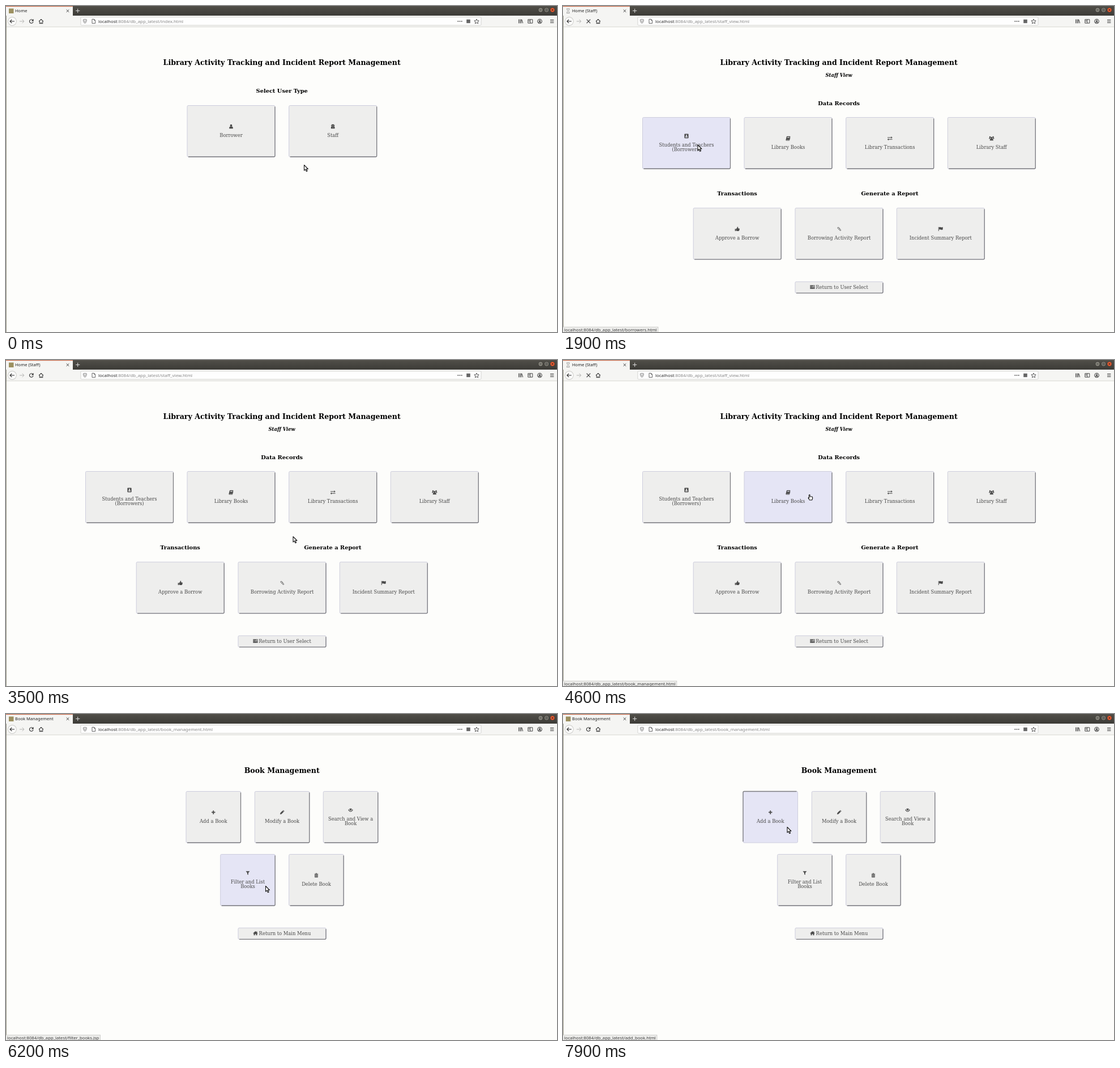
An HTML page with a canvas for the animation above (8 s loop, 973 by 575 pixels).

```html
<!DOCTYPE html>
<html lang="en">
<head>
<meta charset="utf-8">
<title>Library</title>
<style>
html, body { margin: 0; width: 100%; height: 100%; overflow: hidden; background: #fdfdfb; }
canvas { display: block; }
</style>
</head>
<body>
<canvas id="stage" width="973" height="575"></canvas>
<script>
const ctx = document.getElementById('stage').getContext('2d');
const LOOP = 8000, STEP = 100;
const SERIF = '"DejaVu Serif", serif', SANS = '"Noto Sans", "Open Sans", sans-serif';
const INK = '#4a4a4a', HOST = 'localhost', ROOT = ':8084/db_app_latest/';

// Filled glyphs, centred on the origin in a box of about 8 units.
const ICONS = {
  user: 'M-1.9-1.8a1.9 2 0 1 1 3.8 0a1.9 2.2 0 1 1-3.8 0zM-3.3 3.7v-1.3q0-2.2 1.8-2.3q1.5 1 3 0q1.8.1 1.8 2.3v1.3z',
  agent: 'M-3.3 3.8v-2q0-1.5 1-2l-.5-1.3h-.6v-.6h1l.5-1.7h3.8l.5 1.7h1v.6h-.6l-.5 1.3q1 .5 1 2v2zM-1.5-1.2v.8h1.2v-.8zM.3-1.2v.8h1.2v-.8zM-.5 1.2l.5 2l.5-2z',
  badge: 'M-3.6-3.1q0-.8.8-.8h5.6q.8 0 .8.8v6.2q0 .8-.8.8h-5.6q-.8 0-.8-.8zM-1.2-1.2a1.2 1.3 0 1 0 2.4 0a1.2 1.3 0 1 0-2.4 0zM-2.2 2.3h4.4q0-2-1.3-2h-1.8q-1.3 0-1.3 2z',
  book: 'M-1.8-3.6h5.2q.7 0 .5.7l-1.7 5.1q-.2.5-.8.5h-4.2q-.5.4 0 .6h4.7l1.6-4.4l.4.4l-1.4 4.2q-.2.5-.7.5h-4.9q-1.3-.4-.9-1.5l1.3-5.2q.2-.8.9-.9zM-1.2-2.4l-.2.7h3.7l.2-.7zM-1.6-1l-.2.6h3.7l.2-.6z',
  swap: 'M-4.2-2h6.5v-1.4l2.2 2l-2.2 2v-1.5h-6.5zM4.4 1.3h-6.5v-1.3l-2.3 1.9l2.3 2v-1.5h6.5z',
  group: 'M-1.7-1a1.7 1.8 0 1 1 3.4 0a1.7 1.8 0 1 1-3.4 0zM-3 3.8v-1q0-2 1.5-2.2h3q1.5.2 1.5 2.2v1zM-4-2.5a1.2 1.2 0 1 1 2.4 0a1.2 1.2 0 1 1-2.4 0zM1.6-2.5a1.2 1.2 0 1 1 2.4 0a1.2 1.2 0 1 1-2.4 0zM-4.6.8q-.3-2 1-2h1.2l.4 1.5l-1 .5zM4.6.8q.3-2-1-2h-1.2l-.4 1.5l1 .5z',
  thumb: 'M-4-.3h1.7v4h-1.7zM-1.9-.2q2-1.4 2-3.5q1.6-.2 1.5 1.4l-.4 1.4h2.1q1 .2.7 1.2q.3.8-.2 1.2q.1.8-.4 1.1q-.1 1-1 1.1h-2.2q-1 0-2.1-.6z',
  flag: 'M-4-3.5h.9v7.3h-.9zM-2.7-3.1q1.6-.9 3.1 0q1.3.7 3.5-.3v4.3q-2 1.1-3.5.3q-1.4-.8-3.1.1z',
  list: 'M-4.2-3.2h8.4v1.8h-8.4zM-4.2-.9h8.4v1.8h-8.4zM-4.2 1.4h8.4v1.8h-8.4zM1-2.5v.4h2.5v-.4zM-1-.2v.4h4.5v-.4zM2 2.1v.4h1.5v-.4z',
  plus: 'M-.9-3.2h1.8v2.3h2.3v1.8h-2.3v2.3h-1.8v-2.3h-2.3v-1.8h2.3z',
  pencil: 'M-3.6 3.6l.5-2.5l4-4l2 2l-4 4zM1.4-3.3l.7-.6l2 2l-.7.6z',
  eye: 'M-4.3 0q4.3-6 8.6 0q-4.3 6-8.6 0zM-2.9-.5q2.9 5 5.8 0q-1-1.3-1.7-1.4q.7 2.9-1.2 2.9t-1.2-2.9q-.8.2-1.7 1.4z',
  filter: 'M-3.5-3.3h7l-2.6 3v3.7l-1.8-1.2v-2.5z',
  trash: 'M-3.3-2.7h1.8l.4-1h2.2l.4 1h1.8v.8h-6.6zM-2.8-1.4h5.6v5.1h-5.6zM-1.6-.6v3.4h.5v-3.4zM-.3-.6v3.4h.6v-3.4zM1.1-.6v3.4h.5v-3.4z',
  house: 'M-4.2 0l4.2-3.7l1.8 1.6v-1.1h1.1v2.1l1.3 1.1l-.5.5l-.7-.6v3.5h-2.1v-2.3h-1.8v2.3h-2.1v-3.5l-.7.6z'
};
for (const name in ICONS) ICONS[name] = new Path2D(ICONS[name]);

const card = (x, y, w, icon, ...lines) => ({ x, y, w, h: 90.5, icon, lines });
const strip = (y, icon, label) => ({ x: 410, y, w: 155, h: 20, icon, lines: [label], inline: true });
const heading = (text, x, y) => ({ text, x, y, font: `bold 9.83px ${SERIF}` });
const title = text => ({ text, x: 487.2, y: 104, font: `bold 12.6px ${SERIF}` });

const managePage = (noun, plural, file) => ({
  tab: noun + ' Management', file,
  text: [title(noun + ' Management')],
  cards: [
    card(318, 136.5, 96.5, 'plus', 'Add a ' + noun),
    card(439.3, 136.5, 96.5, 'pencil', 'Modify a ' + noun),
    card(560.3, 136.5, 96.5, 'eye', 'Search and View a', noun),
    card(378.7, 247.5, 96.5, 'filter', 'Filter and List', plural),
    card(499.7, 247.5, 96.5, 'trash', 'Delete ' + noun),
    strip(377.3, 'house', 'Return to Main Menu')
  ]
});

const SYSTEM = 'Library Activity Tracking and Incident Report Management';
const PAGES = {
  home: {
    tab: 'Home', file: 'index.html',
    text: [title(SYSTEM), heading('Select User Type', 487.2, 153.4)],
    cards: [card(320, 175.5, 155, 'user', 'Borrower'), card(499.7, 175.5, 155, 'agent', 'Staff')]
  },
  staff: {
    tab: 'Home (Staff)', file: 'staff_view.html',
    text: [
      title(SYSTEM),
      { text: 'Staff View', x: 487.2, y: 125.3, font: `italic bold 8.4px ${SERIF}` },
      heading('Data Records', 487.2, 174.5),
      heading('Transactions', 307.5, 334.2),
      heading('Generate a Report', 577, 334.2)
    ],
    cards: [
      card(140.5, 196.5, 155, 'badge', 'Students and Teachers', '(Borrowers)'),
      card(320, 196.5, 155, 'book', 'Library Books'),
      card(499.7, 196.5, 155, 'swap', 'Library Transactions'),
      card(679.3, 196.5, 155, 'group', 'Library Staff'),
      card(230.2, 356.3, 155, 'thumb', 'Approve a Borrow'),
      card(410, 356.3, 155, 'clip', 'Borrowing Activity Report'),
      card(589.3, 356.3, 155, 'flag', 'Incident Summary Report'),
      strip(486.3, 'list', 'Return to User Select')
    ]
  },
  borrowers: managePage('Borrower', 'Borrowers', 'borrowers.html'),
  books: managePage('Book', 'Books', 'book_management.html')
};

// Each entry holds from its time until the next.
const VISITS = [[0, 'home'], [500, 'staff'], [2000, 'borrowers'], [3400, 'staff'], [4800, 'books']];
const STATUS = [
  [0, ''], [200, 'staff_view.html'], [500, ''], [1500, 'borrowers.html'], [2000, ''],
  [4300, 'book_management.html'], [4900, 'modify_book.html'], [5400, 'search_book.html'],
  [5900, 'filter_books.jsp'], [6500, ''], [7000, 'staff_view.html'],
  [7400, 'filter_books.jsp'], [7700, 'add_book.html']
];
const LOADING = [[300, 500], [1800, 2000], [4500, 4800]];
const PRESSED = [[300, 400], [1700, 1800], [4500, 4600], [7900, 8000]];
const HAND = [[4400, 4800]];
const POINTER = [
  [0, 526.5, 280.5], [300, 545, 234], [600, 539.5, 233.5], [1000, 532, 236], [1600, 246, 247],
  [1900, 238, 245], [2300, 238, 245], [2800, 560, 318], [3300, 14, 24], [3500, 507, 311.5],
  [3900, 490, 302], [4300, 440, 243], [4600, 434.5, 237], [4800, 434.5, 237], [5000, 478, 196],
  [5500, 610, 196], [5800, 560, 240], [6200, 458.5, 303.5], [6800, 14, 29], [7000, 545, 383],
  [7200, 545, 383], [7600, 400, 215], [7900, 396, 199.5]
];

const current = (list, t) => list.filter(e => e[0] <= t).pop()[1];
const within = (spans, t) => spans.some(([a, b]) => t >= a && t < b);

function pointerAt(t) {
  const next = POINTER.findIndex(p => p[0] > t);
  if (next < 0) return POINTER[POINTER.length - 1].slice(1);
  const a = POINTER[next - 1], b = POINTER[next];
  const u = (t - a[0]) / (b[0] - a[0]), k = u * u * (3 - 2 * u);
  return [a[1] + (b[1] - a[1]) * k, a[2] + (b[2] - a[2]) * k];
}

function box(x, y, w, h, color) {
  ctx.fillStyle = color;
  ctx.fillRect(x, y, w, h);
}

function write(text, x, y, font, color = '#000', align = 'left') {
  ctx.font = font;
  ctx.fillStyle = color;
  ctx.textAlign = align;
  ctx.fillText(text, x, y);
  return ctx.measureText(text).width;
}

function line(d, x, y, color = '#3d3d3d', width = 1) {
  ctx.save();
  ctx.translate(x, y);
  ctx.strokeStyle = color;
  ctx.lineWidth = width;
  ctx.stroke(new Path2D(d));
  ctx.restore();
}

function disc(x, y, r, color) {
  ctx.beginPath();
  ctx.arc(x, y, r, 0, 7);
  ctx.fillStyle = color;
  ctx.fill();
}

function drawIcon(name, x, y) {
  if (name === 'clip') {
    line('M1.8-.2l-2.5-2.4q-1-.7-1.6 0t0 1.5l4 3.8q1 .6 1.3 0t-.2-1.3l-3.2-3', x, y, INK, .9);
    return;
  }
  ctx.save();
  ctx.translate(x, y);
  ctx.fillStyle = INK;
  ctx.fill(ICONS[name], 'evenodd');
  ctx.restore();
}

function drawCard(c, hover, pressed) {
  const { x, y, w, h } = c, r = x + w, b = y + h;
  ctx.beginPath();
  ctx.roundRect(x, y, w, h, 2);
  ctx.fillStyle = hover ? '#e5e5f5' : '#eeeeed';
  ctx.fill();
  ctx.strokeStyle = '#cdcddd';
  ctx.lineWidth = 1;
  ctx.stroke();
  const edge = pressed
    ? `M${x} ${b - 2}V${y + 2}Q${x} ${y} ${x + 2} ${y}H${r - 2}`
    : `M${r} ${y + 2}V${b - 2}Q${r} ${b} ${r - 2} ${b}H${x + 2}`;
  line(edge, 0, 0, '#7b7b80', 1.3);

  const font = `8.4px ${SERIF}`, cx = x + w / 2, cy = y + h / 2;
  if (c.inline) {
    write(c.lines[0], cx + 5, cy + 2.8, font, INK, 'center');
    drawIcon(c.icon, cx - 47, cy - .5);
    return;
  }
  const lift = (c.lines.length - 1) * 4;
  drawIcon(c.icon, cx, cy - 8.3 - lift);
  c.lines.forEach((s, i) => write(s, cx, cy + 10.2 - lift + i * 8, font, INK, 'center'));
}

function drawBrowser(page, loading) {
  const bar = ctx.createLinearGradient(0, 0, 0, 17);
  bar.addColorStop(0, '#514f49');
  bar.addColorStop(1, '#3c3b37');
  box(0, 0, 973, 17, bar);
  box(0, 17, 973, 20, '#f5f5f3');
  box(0, 1, 118, 17, '#f5f5f3');
  box(0, 0, 118, 1.2, '#c66a4a');
  box(0, 36.5, 973, .8, '#cfcfca');

  if (loading) line('M-2.8-3.8h5.6M-2.8 3.8h5.6M-2-3.6q0 2.4 1.5 3.6q-1.5 1.2-1.5 3.6M2-3.6q0 2.4-1.5 3.6q1.5 1.2 1.5 3.6', 9, 8.7, '#8b8b8b', .8);
  else box(5, 4.5, 8.5, 8.5, '#9c9060');
  write(page.tab, 16, 11.3, `7.55px ${SANS}`, '#222');
  line('M-2.3-2.3l4.6 4.6M2.3-2.3l-4.6 4.6', 109, 8.6, '#444');
  line('M-3.6 0h7.2M0-3.6v7.2', 126.7, 8.4, '#ddd');
  for (const [x, color] of [[944, '#85837a'], [954.6, '#85837a'], [965, '#e35b32']]) {
    disc(x, 7, 4.3, '#2f2e2a');
    disc(x, 7, 3.7, color);
  }
  line('M-1.7 0h3.4', 944, 7, '#333', .9);
  line('M-1.5-1.5h3v3h-3z', 954.6, 7, '#333', .8);
  line('M-1.5-1.5l3 3M1.5-1.5l-3 3', 965, 7, '#4a241a', .9);

  disc(11, 27, 7.7, '#b9b9b6');
  disc(11, 27, 7.1, '#fbfbfa');
  line('M4 0h-7.8M-.7-3.2l-3.2 3.2l3.2 3.2', 11, 27, '#333', 1.2);
  line('M-4 0h7.8M.7-3.2l3.2 3.2l-3.2 3.2', 28, 27, '#b5b5b3');
  if (loading) line('M-3.3-3.3l6.6 6.6M3.3-3.3l-6.6 6.6', 45, 27, '#3d3d3d', 1.2);
  else {
    line('M2.6-2.1a3.3 3.3 0 1 0 .7 2.9', 44.7, 27, '#3d3d3d', 1.2);
    ctx.fillStyle = '#3d3d3d';
    ctx.fill(new Path2D('M48.7 22.8v3.9h-3.9z'));
  }
  line('M-4 .2l4-3.8l4 3.8M-2.7-.6v4.2h5.4v-4.2M0 3.6v-2.2', 62, 27, '#3d3d3d', 1.1);

  ctx.beginPath();
  ctx.roundRect(132, 19.5, 707, 14.5, 1.5);
  ctx.fillStyle = '#fefefe';
  ctx.fill();
  ctx.strokeStyle = '#cbcbc7';
  ctx.lineWidth = .8;
  ctx.stroke();
  line('M0-3.6l3 .9q0 4.7-3 6.3q-3-1.6-3-6.3zM0-1.8v3.5', 139.4, 27, '#666', .9);
  line('M-2.8-3.7h3.6l2 2v5.4h-5.6zM.8-3.7v2h2', 154.8, 27, '#555', .9);
  const font = `7.9px ${SANS}`;
  const used = write(HOST, 163, 29.8, font, '#2c2c2c');
  write(ROOT + page.file, 163 + used, 29.8, font, '#888');
  for (const dx of [-3.2, 0, 3.2]) disc(801.5 + dx, 27, 1, '#555');
  box(813.2, 23.8, 6.6, 6.4, '#666');
  line('M0-4l1.2 2.7l3 .3l-2.2 2l.6 3l-2.6-1.5l-2.6 1.5l.6-3l-2.2-2l3-.3z', 831, 27, '#444', .9);

  line('M-3.2-3.4v6.9M-1-3.4v6.9M1-3.4v6.9M2-3.2l2 6.5', 908.7, 27, '#444', 1.1);
  line('M-4-3.2h8v6.4h-8zM0-3.2v6.4M-2.8-1.4h1.6M-2.8.2h1.6', 925.8, 27, '#444', 1);
  line('M-3.8 0a3.8 3.8 0 1 1 7.6 0a3.8 3.8 0 1 1-7.6 0M-1.2-.8a1.2 1.2 0 1 1 2.4 0a1.2 1.2 0 1 1-2.4 0M-2.3 2.6q2.3-2.4 4.6 0', 942.5, 27, '#444', 1.1);
  line('M-3.2-2.5h6.4M-3.2 0h6.4M-3.2 2.5h6.4', 964.2, 27, '#444', 1);
}

function drawStatus(file) {
  if (!file) return;
  const font = `7.7px ${SANS}`, text = HOST + ROOT + file;
  ctx.font = font;
  const w = ctx.measureText(text).width + 4.5;
  box(0, 565.8, w, 9.2, '#c4c4c1');
  box(0, 566.6, w - .8, 8.4, '#ededeb');
  write(text, 2, 573.6, font, '#3c3c3c');
}

function drawPointer(x, y, hand) {
  const shape = new Path2D(hand
    ? 'M0 1q.9-1 1.6 0v3h3.3q1.2.2 1.2 1.3v2.2l-1 2.5h-4.2l-2.3-3.6q.2-1 1.4.1z'
    : 'M0 0v9.6l2.2-2l1.7 3.7l1.7-.8l-1.7-3.5h3z');
  ctx.save();
  ctx.translate(x, y);
  ctx.lineJoin = 'round';
  ctx.strokeStyle = '#111';
  ctx.lineWidth = 1.1;
  ctx.fillStyle = '#fff';
  ctx.fill(shape);
  ctx.stroke(shape);
  ctx.restore();
}

function draw(t) {
  const page = PAGES[current(VISITS, t)];
  const [px, py] = pointerAt(t);
  const pressed = within(PRESSED, t);
  box(0, 0, 973, 575, '#fdfdfb');
  drawBrowser(page, within(LOADING, t));
  box(0, 17, .8, 558, '#85826f');
  for (const h of page.text) write(h.text, h.x, h.y, h.font, '#000', 'center');
  for (const c of page.cards) {
    const hover = px > c.x && px < c.x + c.w && py > c.y && py < c.y + c.h;
    drawCard(c, hover, hover && pressed);
  }
  drawStatus(current(STATUS, t));
  drawPointer(px, py, within(HAND, t));
}

const start = performance.now();
function tick() {
  const t = (performance.now() - start) % LOOP;
  draw(Math.floor(t / STEP) * STEP);
  requestAnimationFrame(tick);
}
tick();
</script>
</body>
</html>
```
